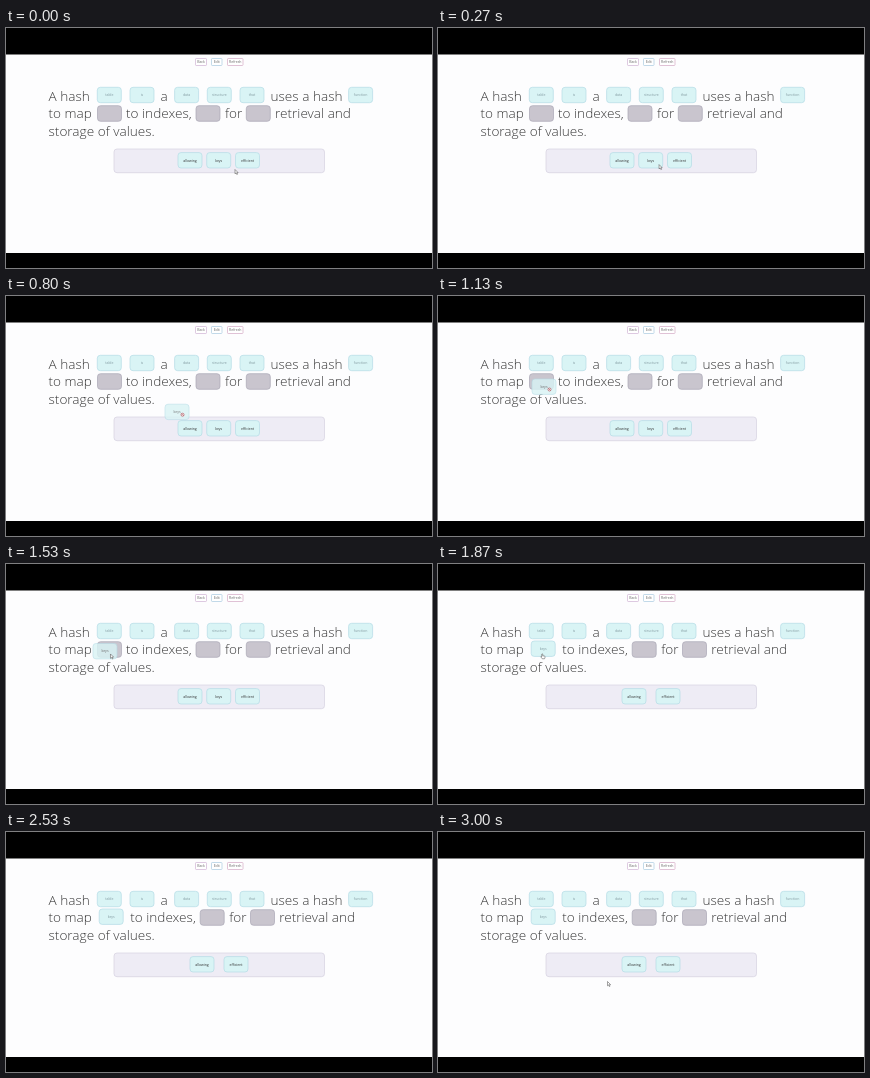
Write an HTML page that moves like this. It is 426x240 px and loops after 3070 ms.

```html
<!DOCTYPE html>
<html lang="en">
<head>
<meta charset="utf-8">
<title>Fill in the blanks</title>
<style>
html, body { margin: 0; width: 100%; height: 100%; overflow: hidden; background: #000; }
svg { display: block; width: 100vw; height: 100vh; }
text { font-family: "Open Sans", "Noto Sans", sans-serif; }
.prose { font-size: 13.6px; font-weight: 300; fill: #393939; }
.label { font-size: 3.5px; text-anchor: middle; }
</style>
</head>
<body>
<svg id="stage" viewBox="0 0 426 240"></svg>
<script>
const LOOP = 3070, DROP = 1670;
const stage = document.getElementById('stage');

function add(parent, tag, attrs = {}, content) {
  const node = document.createElementNS('http://www.w3.org/2000/svg', tag);
  for (const key in attrs) node.setAttribute(key, attrs[key]);
  if (content) node.textContent = content;
  parent.append(node);
  return node;
}
const group = (parent = stage) => add(parent, 'g');
const box = (parent, x, y, width, height, fill, stroke, rx = 3) =>
  add(parent, 'rect', { x, y, width, height, rx, fill, stroke, 'stroke-width': 0.7 });
const prose = (parent, x, y, words) => add(parent, 'text', { x, y, class: 'prose' }, words);
const place = (node, x, y) => node.setAttribute('transform', `translate(${x} ${y})`);
const show = (node, on) => node.setAttribute('visibility', on ? 'visible' : 'hidden');

// A tile is drawn around its centre.
function tile(parent, x, y, word, ink) {
  const g = group(parent);
  box(g, -12, -7.7, 24, 15.4, '#d9f4f5', '#b5dce6');
  add(g, 'text', { y: 1.2, class: 'label', fill: ink }, word);
  place(g, x, y);
  return g;
}
const gap = (parent, x) => box(parent, x, 77.7, 24, 15.6, '#c9c5ce', '#aaa7b5');

add(stage, 'rect', { width: 426, height: 240, fill: '#000' });
add(stage, 'rect', { y: 26.5, width: 426, height: 198.5, fill: '#fdfdfe' });

function button(x, width, word, color) {
  box(stage, x, 30.5, width, 7, '#fff', color, 0.7);
  add(stage, 'text', { x: x + width / 2, y: 35.3, class: 'label', fill: '#666' }, word);
}
button(189.5, 11, 'Back', '#d0b4d4');
button(205.5, 10.5, 'Edit', '#a9cbe0');
button(221.5, 15.5, 'Refresh', '#d5a9c4');

prose(stage, 42.5, 73, 'A hash');
prose(stage, 154.5, 73, 'a');
prose(stage, 264.5, 73, 'uses a hash');
prose(stage, 42.5, 90.3, 'to map');
prose(stage, 42.5, 108, 'storage of values.');

const FADED = '#829aa0', DARK = '#333';
[[103.3, 'table'], [136, 'is'], [180.6, 'data'], [213.3, 'structure'], [246, 'that'], [354.6, 'function']]
  .forEach(([x, word]) => tile(stage, x, 67, word, FADED));

const firstGap = gap(stage, 91.5);
const placed = tile(stage, 105.2, 84.7, 'keys', FADED);
const rest = group();
prose(rest, 120, 90.3, 'to indexes,');
gap(rest, 190);
prose(rest, 219, 90.3, 'for');
gap(rest, 240.3);
prose(rest, 269, 90.3, 'retrieval and');

box(stage, 108, 121, 210.5, 23.7, '#eeecf5', '#d6d2e0');
const allowing = tile(stage, 184, 132.3, 'allowing', DARK);
const keys = tile(stage, 212.7, 132.3, 'keys', DARK);
const efficient = tile(stage, 241.5, 132.3, 'efficient', DARK);

const ghost = tile(stage, 0, 0, 'keys', '#555');
ghost.setAttribute('opacity', 0.8);

const line = { fill: '#fff', stroke: '#555', 'stroke-width': 0.55, 'stroke-linejoin': 'round' };
const cursors = { arrow: group(), hand: group(), barred: group() };
add(cursors.arrow, 'path', { ...line, d: 'M0 0V4.3L1 3.4L1.8 5L2.5 4.7L1.8 3.1H3.1Z' });
add(cursors.hand, 'path', {
  ...line, d: 'M-.5 .3Q0 -.4 .5 .3V2L2.4 2.4Q3 2.6 2.8 3.4L2.3 5H0L-1.5 3.1Q-1.4 2.4 -.5 3Z'
});
add(cursors.barred, 'circle', { r: 1.5, fill: '#fff', stroke: '#b0525b', 'stroke-width': 0.7 });
add(cursors.barred, 'path', { d: 'M-1 -1L1 1', stroke: '#b0525b', 'stroke-width': 0.7 });

// Pointer stops: time, x, y
const path = [
  [0, 229, 141.5], [400, 218.5, 135], [600, 218.5, 135], [1070, 111.5, 93.5],
  [1200, 111.5, 93.5], [1500, 104.5, 90], [2270, 104, 89.5],
  [2800, 169.5, 149.5], [LOOP, 169.5, 149.5]
];

function pointer(t) {
  const i = path.findIndex(stop => stop[0] > t);
  const [t0, x0, y0] = path[i - 1], [t1, x1, y1] = path[i];
  const p = (t - t0) / (t1 - t0), k = p * p * (3 - 2 * p);
  return [x0 + (x1 - x0) * k, y0 + (y1 - y0) * k];
}

function cursorKind(t) {
  if (t >= 2400 && t < 2660) return '';
  if (t < 330 || t >= 2660) return 'arrow';
  if (t >= 670 && t < 1270) return 'barred';
  return t >= 1270 && t < DROP ? 'arrow' : 'hand';
}

function render(t) {
  const dropped = t >= DROP;
  const [x, y] = pointer(t);
  show(firstGap, !dropped);
  show(placed, dropped);
  show(keys, !dropped);
  show(ghost, t >= 600 && !dropped);
  place(ghost, x - 5.5, y - 2.8);
  place(rest, dropped ? 4.2 : 0, 0);
  place(allowing, dropped ? 196 : 184, 132.3);
  place(efficient, dropped ? 230 : 241.5, 132.3);
  const kind = cursorKind(t);
  for (const name in cursors) {
    show(cursors[name], name === kind);
    place(cursors[name], x, y);
  }
}

const start = performance.now();
function tick() {
  render((performance.now() - start) % LOOP);
  requestAnimationFrame(tick);
}
tick();
</script>
</body>
</html>
```
